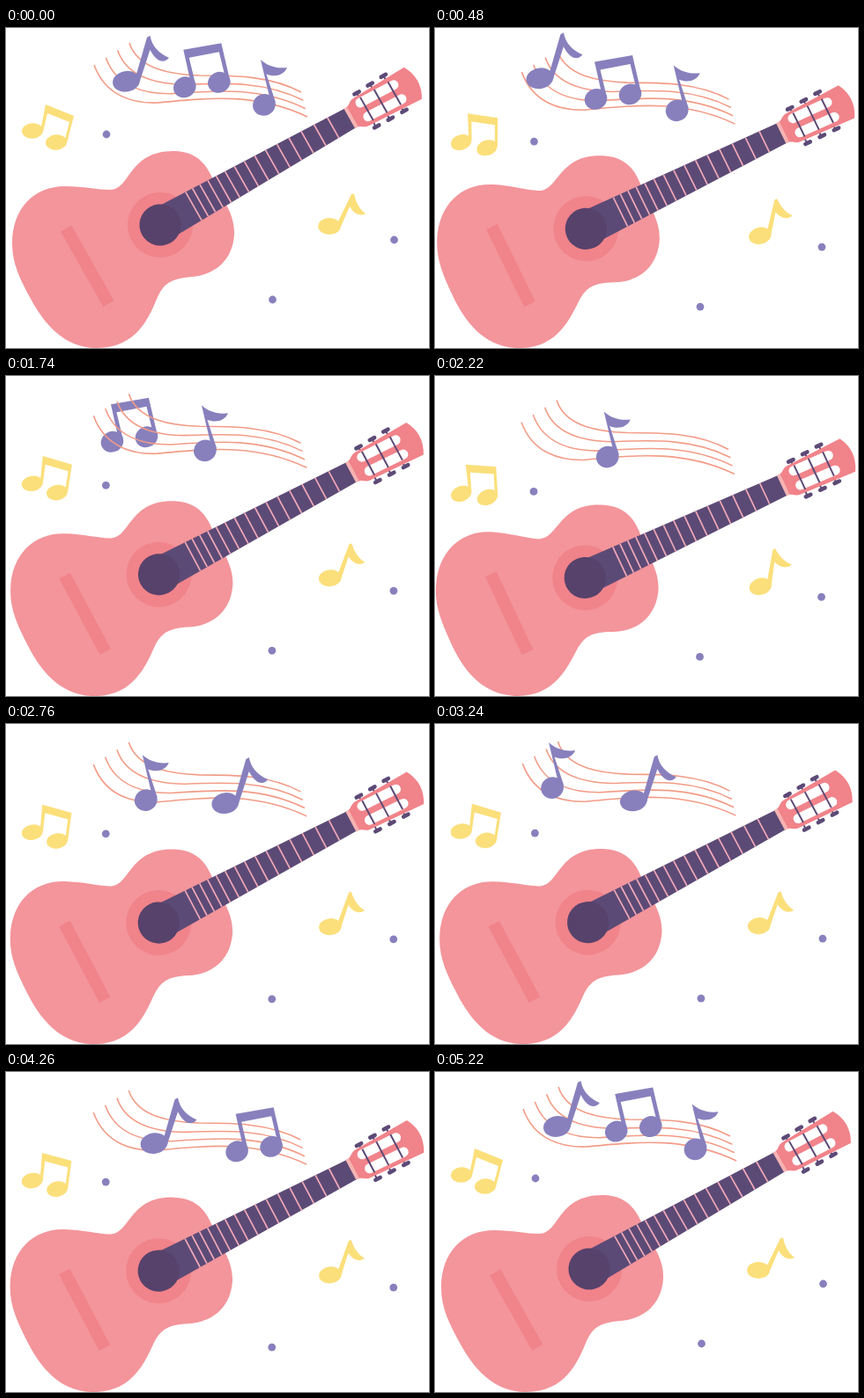
Animation, 480 px wide and 364 px high, one loop 5.28 s. Source, as an HTML page:

```html
<!DOCTYPE html>
<html lang="en">
<head>
<meta charset="utf-8">
<title>Guitar and notes</title>
<style>
  html, body { margin: 0; width: 100%; height: 100%; overflow: hidden; background: #fff; }
  svg { display: block; width: 100vw; height: 100vh; }
  .purple { fill: #8880bd; }
  .yellow { fill: #fbdf7a; }
  .dark { fill: #5c4a76; }
  .accent { fill: #f1838a; }
</style>
</head>
<body>
<svg viewBox="0 0 480 364">
  <g id="guitar">
    <path fill="#f3959b" d="M7 245C7 205 32 180 67 180C88 180 104 184 118 184C142 184 138 140 190 140
      C225 140 232 167 239 181C247 197 260 213 259 235C257 266 235 281 211 283C185 285 179 292 172 306
      C162 330 148 364 103 364C66 364 43 336 28 308C16 286 7 268 7 245Z"/>
    <!-- x runs along the neck, starting at the sound hole -->
    <g transform="translate(175 224) rotate(-29.4)">
      <rect class="accent" x="-102" y="-49" width="14" height="98"/>
      <circle class="accent" r="37"/>
      <path class="dark" d="M0 -19.7L247 -12.5V12.5L0 19.7Z"/>
      <circle fill="#57426b" r="23.6"/>
      <path id="frets" stroke="#f0a8b8" stroke-width="1.7"/>
      <path id="pegs" stroke="#5c4a76" stroke-width="2"/>
      <path id="knobs" stroke="#5c4a76" stroke-width="4.6" stroke-linecap="round"/>
      <path class="accent" d="M250 -13C254 -13 256 -18 262 -18L329 -20.500Q341 0 329 21L262 18C256 18 254 13 250 13Z"/>
      <path d="M248.500 -13V13" stroke="#f6b3b3" stroke-width="4"/>
      <path d="M266 -9.700L309 -8.700M266 8.300L309 9.800" stroke="#fff" stroke-width="11" stroke-linecap="round"/>
      <path id="posts" stroke="#5c4a76" stroke-width="2"/>
    </g>
  </g>

  <g id="dots" class="purple">
    <circle cx="114" cy="121" r="4.4"/>
    <circle cx="440.5" cy="241" r="4.4"/>
    <circle cx="302.5" cy="309" r="4.4"/>
  </g>

  <g id="pair" class="yellow">
    <ellipse cx="30" cy="117" rx="12" ry="8.7" transform="rotate(-4 30 117)"/>
    <ellipse cx="57" cy="130" rx="12" ry="8.7" transform="rotate(-4 57 130)"/>
    <path d="M45 87L77 100L69 131L66 130L72 107L47 97L42 118L39 117Z"/>
  </g>

  <g id="single" class="yellow">
    <ellipse cx="367" cy="225.5" rx="12.8" ry="9.5"/>
    <path d="M376 222L392 189L395 188.500C397 199 402 207 408 211C402 214.500 395 212 390 203L379.500 227Z"/>
  </g>

  <g id="score">
    <g id="back" class="purple"></g>
    <path id="staff" fill="none" stroke="#f29c87" stroke-width="1.6"/>
    <g id="front" class="purple">
      <g id="swoop">
        <ellipse rx="15.5" ry="11.8" transform="rotate(-10)"/>
        <path d="M10 -3L23.500 -50L27 -52C29 -40 38 -31 48.500 -27C43 -20 34 -22 27 -36L15 1Z"/>
      </g>
      <g id="beam">
        <ellipse rx="13" ry="11.7" transform="rotate(-25)"/>
        <ellipse cx="39" cy="-5.5" rx="13" ry="11.7" transform="rotate(-25 39 -5.500)"/>
        <path d="M-1.500 -42.500L41.500 -50L51.500 -7L47.500 -5L39 -40L5 -33.500L12.500 -2L8 0Z"/>
      </g>
      <g id="flag">
        <ellipse rx="13" ry="12.2" transform="rotate(-25)"/>
        <path d="M-4 -51.500C3 -45 13 -41 26 -42.500C23 -34 12 -31 2.500 -35L13 -3L8 -1Z"/>
      </g>
    </g>
  </g>
</svg>
<script>
const LOOP = 5280, SWING = 1510, SWINGS = 3;
const STEP = 975, FIRST = 2325, FADE = 180, COVERED = 400;

// Waypoints of each note head along the staff, one per STEP; each note enters one STEP after the last
const trails = {
  swoop: [[271, 88], [223, 84], [168, 77], [137.5, 61.5], [105, 38]],
  beam: [[322, 104], [262, 86], [204, 67], [166, 78], [111, 70]],
  flag: [[345, 100], [294, 87.5], [260, 84], [219, 81], [150, 83], [104, 45]]
};
const names = Object.keys(trails);

// Outer staff lines as two joined cubic curves; the inner ones lie evenly between them
const topLine = [140, 17, 150, 48, 190, 53, 220, 54, 258, 54, 300, 54, 335, 73];
const bottomLine = [100, 42, 113, 78, 145, 86, 172, 85, 235, 79, 285, 74, 342, 101];

const $ = id => document.getElementById(id);
const mix = (a, b, u) => a.map((v, i) => v + (b[i] - v) * u);
const move = (id, transform) => $(id).setAttribute('transform', transform);

function draw(id, count, part) {
  $(id).setAttribute('d', Array.from({ length: count }, (_, i) => part(i)).join(''));
}

function build() {
  draw('staff', 4, i => {
    const [x, y, ...curve] = mix(topLine, bottomLine, i / 3);
    return `M${x} ${y}C${curve.join(' ')}`;
  });
  draw('frets', 15, i => {
    const x = 43.5 + 8.5 * i + .32 * i * i, h = 19.7 - x * 7.2 / 247;
    return `M${x} ${-h}V${h}`;
  });
  const row = i => 268 + 18 * i, top = i => -20.8 - 1.1 * i;
  draw('pegs', 3, i => `M${row(i)} ${top(i)}V23`);
  draw('knobs', 3, i => `M${row(i) - 3} ${top(i) - .5}h6M${row(i) - 2} 23h6`);
  draw('posts', 3, i => `M${row(i) + 1} -15V15`);
}

function placeNote(name, order, now) {
  const trail = trails[name], life = STEP * (trail.length - 1);
  const age = (now - FIRST - STEP * order + LOOP) % LOOP;
  const edge = Math.min(age, life - age), note = $(name);
  note.setAttribute('opacity', Math.max(0, Math.min(1, edge / FADE)));
  if (edge <= 0) return;
  const i = Math.floor(age / STEP);
  move(name, `translate(${mix(trail[i], trail[i + 1], age / STEP - i)})`);
  // The staff shows over a note that is entering or leaving
  const layer = $(edge < COVERED ? 'back' : 'front');
  if (note.parentNode !== layer) layer.appendChild(note);
}

function render(t) {
  const p = t < SWING * SWINGS ? Math.abs(Math.sin(Math.PI * t / SWING)) ** 1.5 : 0;
  const drift = `translate(${-2 * p} ${10.5 * p})`;
  move('guitar', `rotate(${4.3 * p} 99 163)`);
  move('dots', drift);
  move('score', drift);
  move('pair', `translate(${1.1 * p} ${12.5 * p}) rotate(${-18 * p} 43.5 123.5)`);
  move('single', `translate(${2.3 * p} ${14 * p}) rotate(${-16 * p} 367 225.5)`);
  names.forEach((name, order) => placeNote(name, order, t));
}

build();
const begin = performance.now();
function tick() {
  render((performance.now() - begin) % LOOP);
  requestAnimationFrame(tick);
}
tick();
</script>
</body>
</html>
```
